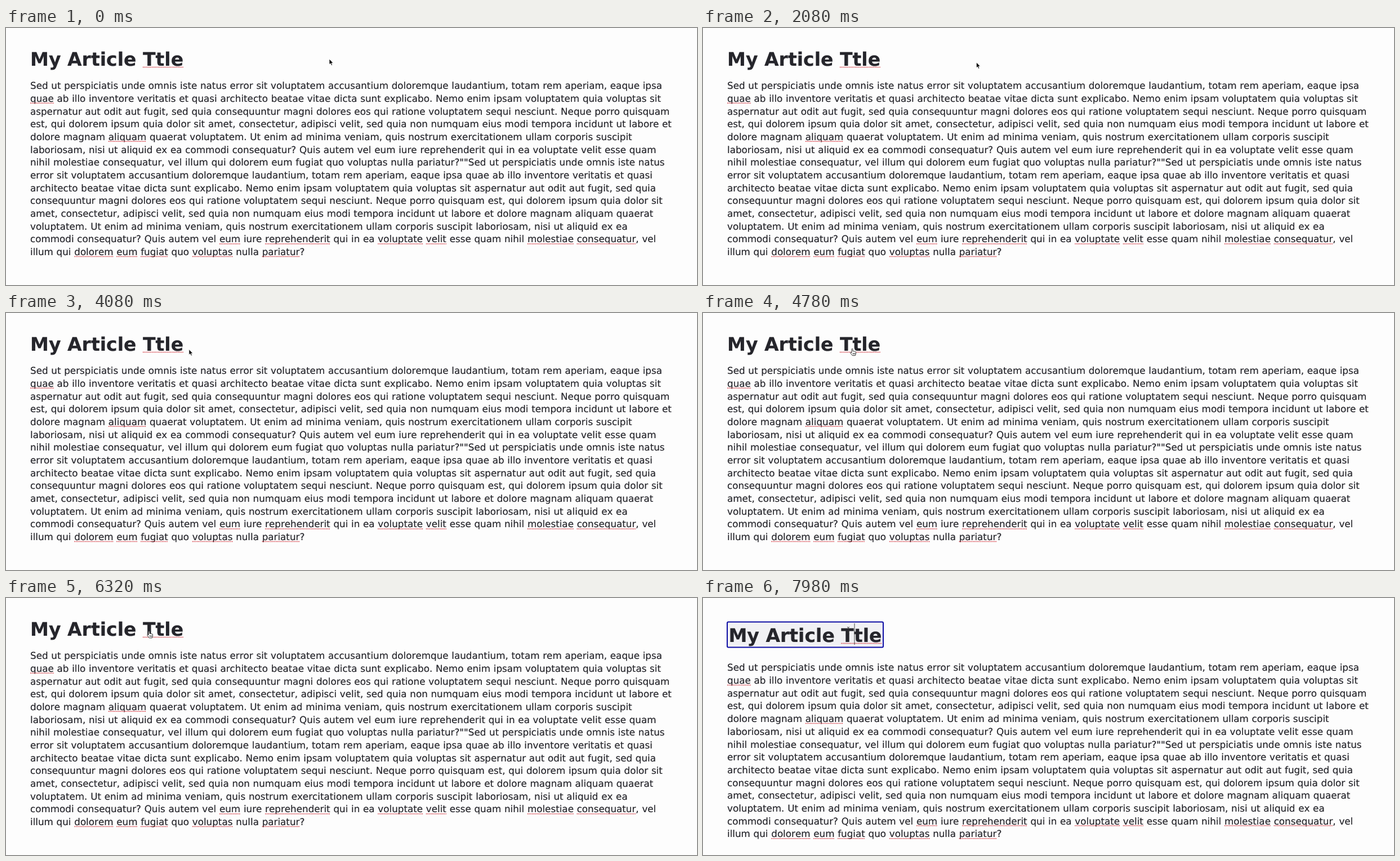
Write an HTML page that moves like this. It is 1227 by 456 pixels and loops after 8 s.

```html
<!DOCTYPE html>
<html lang="la">
<meta charset="utf-8">
<title>Inline editing</title>
<style>
  html, body { margin: 0; width: 100%; height: 100%; overflow: hidden; background: #fdfdfd; }
  svg { display: block; width: 1227px; height: 456px; }
  text {
    font: 16.75px "DejaVu Sans", Verdana, sans-serif;
    word-spacing: .4px;
    font-kerning: none;
    text-rendering: geometricPrecision;
    fill: #25252b;
    stroke: #25252b;
    stroke-width: .2;
  }
  #title text { font-size: 33.1px; font-weight: bold; word-spacing: 0; }
  .typo { stroke: #d0303a; stroke-width: 1.5; stroke-dasharray: 1.5 1.2; }
</style>
<svg viewBox="0 0 1227 456">
  <rect id="box" x="43" y="42.5" width="277" height="45" rx="2" fill="#f1f1f4" stroke="#0c0ca4" stroke-width="2"/>
  <g id="title"></g>
  <g id="body"></g>
  <path id="caret" d="M269 45V83" stroke="#444" stroke-width="1"/>
  <g id="pointer">
    <path id="arrow" d="M0 0V9.8L2.2 7.8L3.8 11.4L5.5 10.6L3.9 7.2H7Z" fill="#000" stroke="#fff" stroke-width=".8"/>
    <g id="hand" stroke="#222" stroke-width=".9" stroke-linejoin="round">
      <path fill="#fff" d="M-1 6V.9a1 1 0 0 1 2 0V4.4q1.1-.8 2 .2q1.1-.6 1.8.4q1.6-.4 1.7 1.2V8.5L5.4 12H.3L-3 7.7q-.7-1.5.7-1.7L-1 7.2Z"/>
      <path fill="none" d="M1.4 7.5V10M3.1 7.5V10M4.8 7.5V10"/>
    </g>
    <path id="beam" d="M-2-6Q0-6 0-4Q0-6 2-6M0-4V4M-2 6Q0 6 0 4Q0 6 2 6M-1.2 2H1.2" fill="none" stroke="#333" stroke-width=".9"/>
  </g>
</svg>
<script>
const $ = id => document.getElementById(id);
const LOOP = 8000, EDIT_AT = 7760, LEFT = 43, LEADING = 22.69;

const lines = [
  'Sed ut perspiciatis unde omnis iste natus error sit voluptatem accusantium doloremque laudantium, totam rem aperiam, eaque ipsa',
  'quae ab illo inventore veritatis et quasi architecto beatae vitae dicta sunt explicabo. Nemo enim ipsam voluptatem quia voluptas sit',
  'aspernatur aut odit aut fugit, sed quia consequuntur magni dolores eos qui ratione voluptatem sequi nesciunt. Neque porro quisquam',
  'est, qui dolorem ipsum quia dolor sit amet, consectetur, adipisci velit, sed quia non numquam eius modi tempora incidunt ut labore et',
  'dolore magnam aliquam quaerat voluptatem. Ut enim ad minima veniam, quis nostrum exercitationem ullam corporis suscipit',
  'laboriosam, nisi ut aliquid ex ea commodi consequatur? Quis autem vel eum iure reprehenderit qui in ea voluptate velit esse quam',
  'nihil molestiae consequatur, vel illum qui dolorem eum fugiat quo voluptas nulla pariatur?""Sed ut perspiciatis unde omnis iste natus',
  'error sit voluptatem accusantium doloremque laudantium, totam rem aperiam, eaque ipsa quae ab illo inventore veritatis et quasi',
  'architecto beatae vitae dicta sunt explicabo. Nemo enim ipsam voluptatem quia voluptas sit aspernatur aut odit aut fugit, sed quia',
  'consequuntur magni dolores eos qui ratione voluptatem sequi nesciunt. Neque porro quisquam est, qui dolorem ipsum quia dolor sit',
  'amet, consectetur, adipisci velit, sed quia non numquam eius modi tempora incidunt ut labore et dolore magnam aliquam quaerat',
  'voluptatem. Ut enim ad minima veniam, quis nostrum exercitationem ullam corporis suscipit laboriosam, nisi ut aliquid ex ea',
  'commodi consequatur? Quis autem vel eum iure reprehenderit qui in ea voluptate velit esse quam nihil molestiae consequatur, vel',
  'illum qui dolorem eum fugiat quo voluptas nulla pariatur?'
];
const typos = {
  1: 'quae',
  4: 'aliquam',
  12: 'eum reprehenderit voluptate velit molestiae consequatur',
  13: 'dolorem eum fugiat voluptas pariatur'
};

function add(parent, tag, attrs) {
  const el = document.createElementNS('http://www.w3.org/2000/svg', tag);
  for (const key in attrs) el.setAttribute(key, attrs[key]);
  return parent.appendChild(el);
}

// Writes one line and underlines its misspelt words.
function write(parent, string, y, wrong = '') {
  const text = add(parent, 'text', { x: LEFT, y });
  text.textContent = string;
  for (const word of wrong.split(' ').filter(Boolean)) {
    const at = string.lastIndexOf(word);
    add(parent, 'line', {
      class: 'typo', y1: y + 2.4, y2: y + 2.4,
      x1: text.getStartPositionOfChar(at).x,
      x2: text.getEndPositionOfChar(at + word.length - 1).x
    });
  }
}

write($('title'), 'My Article Ttle', 67, 'Ttle');
lines.forEach((line, i) => write($('body'), line, 108.2 + i * LEADING, typos[i]));

// Pointer path: time, x, y
const path = [
  [0, 574, 55], [900, 574, 55], [3100, 409, 66], [4780, 265, 63.5],
  [5720, 251, 61], [7120, 258, 56], [LOOP, 258, 57.5]
];

function pointerAt(t) {
  const i = path.findIndex(p => p[0] > t);
  const [t0, x0, y0] = path[i - 1], [t1, x1, y1] = path[i];
  const k = (t - t0) / (t1 - t0);
  return [x0 + (x1 - x0) * k, y0 + (y1 - y0) * k];
}

const show = (id, on) => $(id).style.display = on ? '' : 'none';
const move = (id, x, y) => $(id).setAttribute('transform', `translate(${x} ${y})`);

function draw(now) {
  const t = now % LOOP, editing = t >= EDIT_AT;
  const [x, y] = pointerAt(t), over = x < 316;
  move('title', editing ? 2.4 : 0, editing ? 11.2 : 0);
  move('body', 0, editing ? 21.2 : 0);
  move('pointer', x, y);
  show('box', editing);
  show('caret', editing);
  show('arrow', !over);
  show('hand', over && !editing);
  show('beam', editing);
  requestAnimationFrame(() => draw(performance.now() - start));
}
const start = performance.now();
draw(0);
</script>
</html>
```
